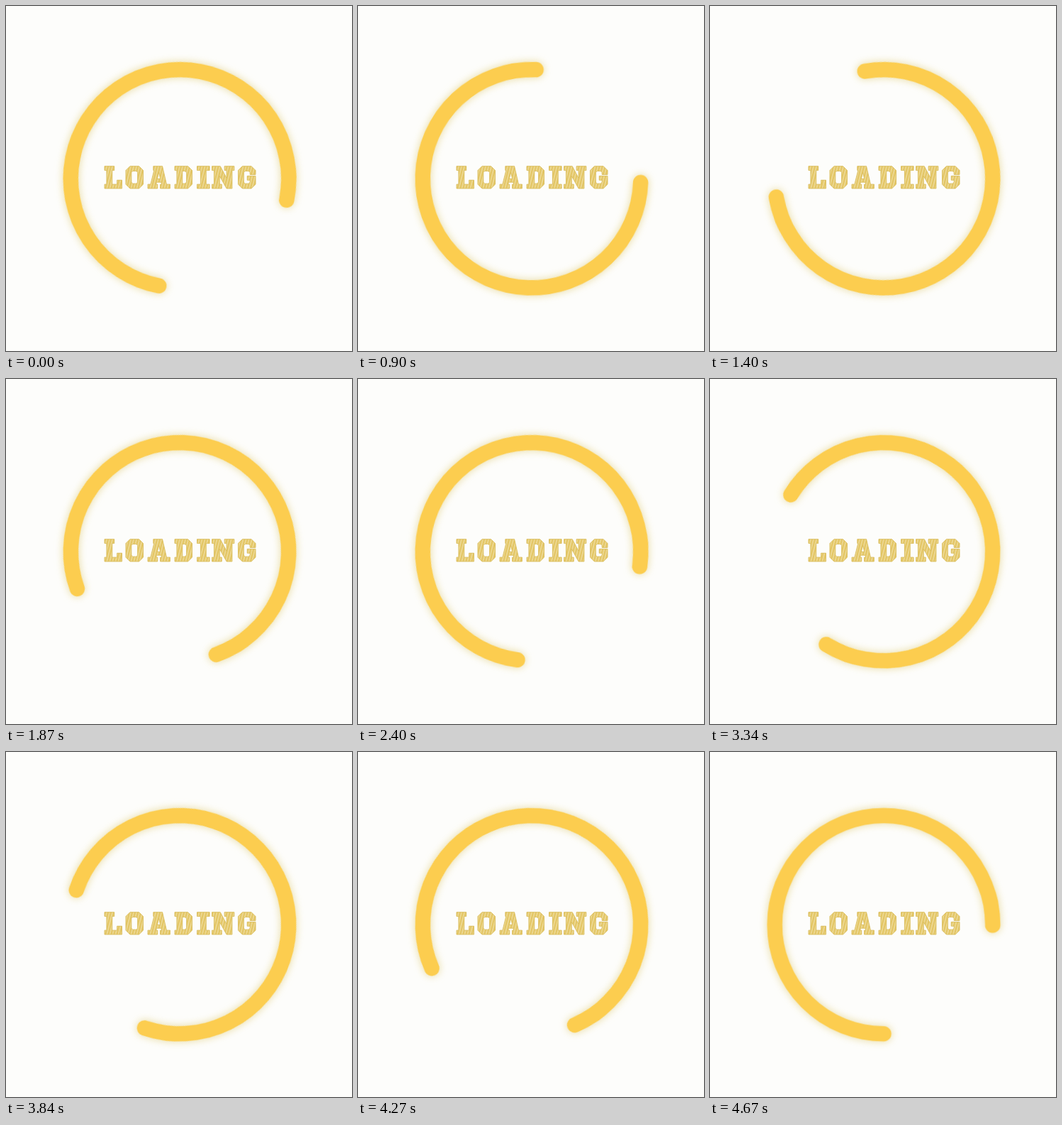
An HTML page for the animation above (4700 ms loop, 488 px wide and 486 px high).

```html
<!DOCTYPE html>
<html lang="en">
<head>
<meta charset="utf-8">
<title>Loading</title>
<style>
  html, body { margin: 0; width: 100%; height: 100%; overflow: hidden; background: #fdfdfb; }
  svg { display: block; width: 488px; height: 486px; }
  .glow { filter: drop-shadow(0 0 6px rgba(226, 208, 130, .75)); }
  #ring {
    fill: none; stroke: #fccd4f; stroke-width: 21.5; stroke-linecap: round;
    stroke-dasharray: 270.3 89.7;
    transform-origin: 245px 243.3px;
  }
  #word { fill-rule: evenodd; stroke: #d9bb58; stroke-width: .9; stroke-linejoin: round; }
  .label { font: 700 34px "DejaVu Serif", serif; fill: none; }
</style>
</head>
<body>
<svg viewBox="0 0 488 486" role="img" aria-label="LOADING">
  <defs>
    <pattern id="hatch" width="4" height="4" patternUnits="userSpaceOnUse" patternTransform="rotate(14)">
      <rect width="4" height="4" fill="#e3c563"/>
      <path d="M3 0V4" stroke="#f3e4ae" stroke-width="1.2"/>
    </pattern>
  </defs>
  <g class="glow"><circle id="ring" cx="245" cy="243.3" r="153.7" pathLength="360"/></g>
  <text class="label" x="138" y="257">LOADING</text>
  <g id="word" fill="url(#hatch)"></g>
</svg>
<script>
  // Block lettering, 32 units tall: [left edge, outline]
  const letters = [
    [139, "M0 0H14V6H11V26H18V20H25V32H0V26H3V6H0Z"],
    [169, "M6 0H19L25 6V26L19 32H6L0 26V6ZM10 7H15L17 9V23L15 25H10L8 23V9Z"],
    [200, "M8 0H21L27 26H32V32H18V26H20L19.4 23H12.6L12 26H14V32H0V26H4L9 6H8ZM16 9L18 18H13.6Z"],
    [238, "M0 0H19L25 6V26L19 32H0V26H3V6H0ZM11 7V25H14.5L17 23V9L14.5 7Z"],
    [269.5, "M0 0H18V6H13V26H18V32H0V26H5V6H0Z"],
    [290.5, "M0 0H12L21 17V6H18V0H32V6H29V32H21L11 14V26H14V32H0V26H3V6H0Z"],
    [327.5, "M6 0H19L25 6V12H17V9L15 7H10L8 9V23L10 25H15L17 23V20H13V14H25V26L19 32H6L0 26V6Z"]
  ];
  const word = document.getElementById("word");
  for (const [x, d] of letters) {
    const path = document.createElementNS("http://www.w3.org/2000/svg", "path");
    path.setAttribute("d", d);
    path.setAttribute("transform", `translate(${x} 225.7) scale(.98)`);
    word.append(path);
  }

  // Clockwise turn in degrees at each tick; 30 ticks per second, speeding up
  const LOOP = 4700, TICK = 1000 / 30, START = 101;
  const turns = [
    [0, 0], [9, 0], [27, 261], [42, 519], [72, 1076.5],
    [100, 1550.5], [115, 1897.5], [140, 2509]
  ];
  const frames = turns.map(([tick, deg], i) => ({
    offset: Math.max(0, tick * TICK - 1) / LOOP,
    transform: `rotate(${START + deg}deg)`,
    easing: i + 1 < turns.length ? `steps(${turns[i + 1][0] - tick})` : "linear"
  }));
  frames.push({ offset: 1, transform: frames.at(-1).transform });
  document.getElementById("ring").animate(frames, { duration: LOOP, iterations: Infinity });
</script>
</body>
</html>
```
